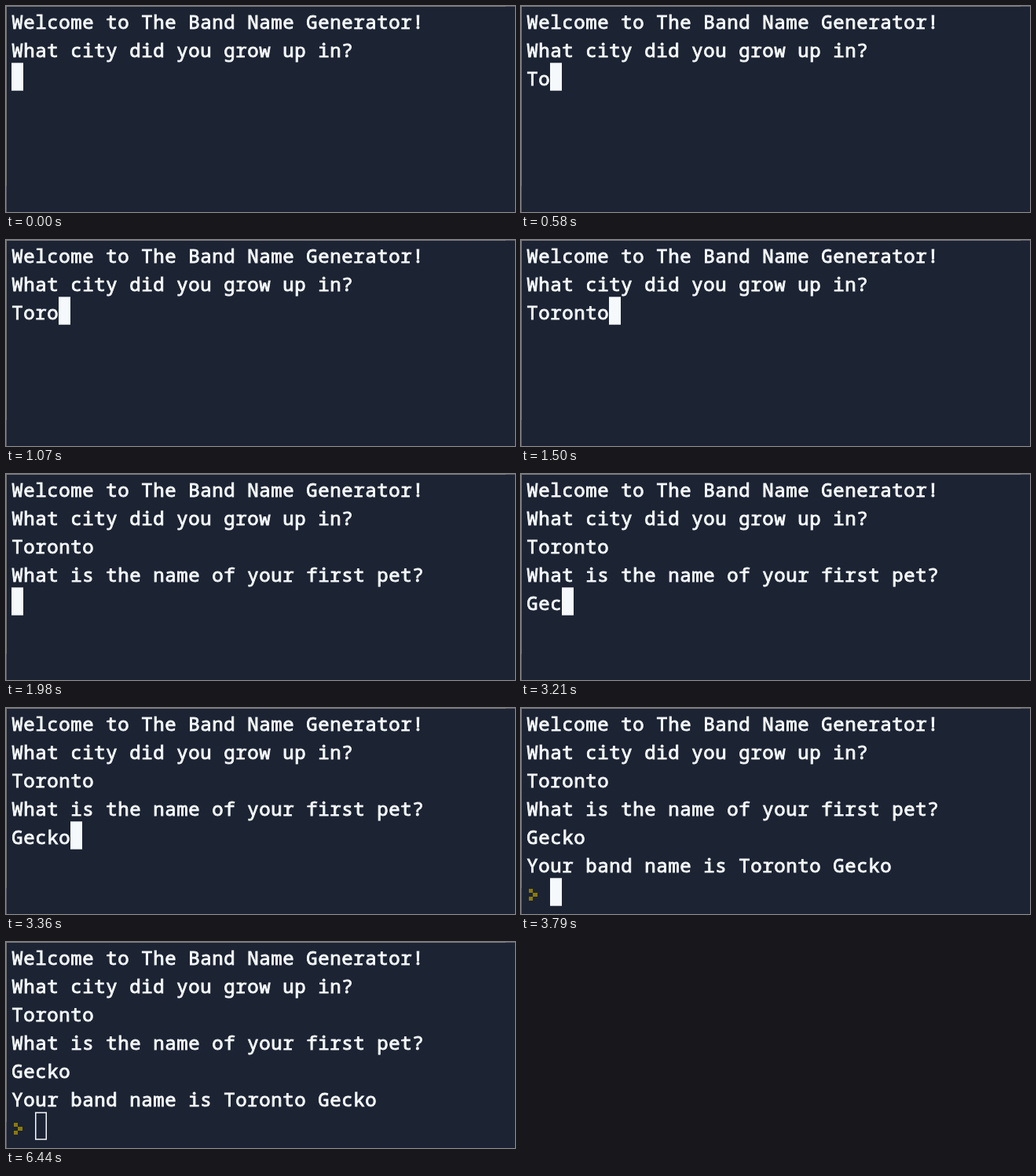
Animation, 648 px wide and 262 px high, one loop 6.47 s. Source, as an HTML page:

```html
<!DOCTYPE html>
<html lang="en">
<head>
<meta charset="utf-8">
<title>Band name terminal</title>
<style>
  html, body { margin: 0; width: 100%; height: 100%; overflow: hidden; background: #1c2333; }
  svg { display: block; }
  text {
    font: 24px "Noto Sans Mono", "DejaVu Sans Mono", monospace;
    letter-spacing: 0.6px;
    fill: #f5f9fc;
    stroke: #f5f9fc;
    stroke-width: 0.9;
    white-space: pre;
  }
  #cursor { fill: #f5f9fc; stroke: #f5f9fc; stroke-width: 1.5; }
  #cursor.hollow { fill: none; }
  #prompt { fill: #8a7a08; }
  .edge { fill: #5d6069; }
  .edge.lit { fill: #777777; }
</style>
</head>
<body>
<svg width="648" height="262" viewBox="0 0 648 262">
  <rect width="648" height="262" fill="#1c2333"/>
  <path class="edge" d="M0 0h648v1H1v261H0z"/>
  <path class="edge lit" d="M0 0h636v1H1v228H0z"/>
  <g id="lines"></g>
  <path id="prompt" d="M10 230h5v5h6v5h-6v5h-5v-5h5v-5h-5z"/>
  <rect id="cursor" width="13.5" height="33.9"/>
</svg>
<script>
  const LOOP = 6470, LEFT = 7, CELL = 15, ROW = 36, BASELINE = 28.5;
  const CITY = "Toronto", PET = "Gecko";
  const ASK_PET = 1980, DONE = 3790, BLUR = 6440;

  // Times at which each further count of typed letters appears.
  const cityKeys = [[80, 1], [580, 2], [740, 3], [1070, 4], [1410, 5], [1500, 7]];
  const petKeys = [[2620, 1], [3050, 2], [3210, 3], [3300, 4], [3360, 5]];

  const group = document.getElementById("lines");
  const prompt = document.getElementById("prompt");
  const cursor = document.getElementById("cursor");

  const rows = Array.from({ length: 6 }, (_, i) => {
    const row = document.createElementNS("http://www.w3.org/2000/svg", "text");
    row.setAttribute("x", LEFT + 0.3);
    row.setAttribute("y", i * ROW + BASELINE);
    return group.appendChild(row);
  });

  function typed(word, keys, t) {
    let count = 0;
    for (const [time, n] of keys) if (t >= time) count = n;
    return word.slice(0, count);
  }

  function screen(t) {
    const lines = [
      "Welcome to The Band Name Generator!",
      "What city did you grow up in?",
      typed(CITY, cityKeys, t)
    ];
    if (t >= ASK_PET) lines.push("What is the name of your first pet?", typed(PET, petKeys, t));
    if (t >= DONE) lines.push(`Your band name is ${CITY} ${PET}`);
    return lines;
  }

  function draw(t) {
    const lines = screen(t), done = t >= DONE;
    rows.forEach((row, i) => {
      const line = lines[i] || "";
      if (row.textContent !== line) row.textContent = line;
    });
    const cursorRow = done ? 6 : lines.length - 1;
    const column = done ? 2 : lines[cursorRow].length;
    cursor.setAttribute("x", LEFT + column * CELL + 0.75);
    cursor.setAttribute("y", cursorRow * ROW + 1.05);
    cursor.classList.toggle("hollow", t >= BLUR);
    prompt.style.display = done ? "" : "none";
  }

  const start = performance.now();
  function tick() {
    draw((performance.now() - start) % LOOP);
    requestAnimationFrame(tick);
  }
  tick();
</script>
</body>
</html>
```
